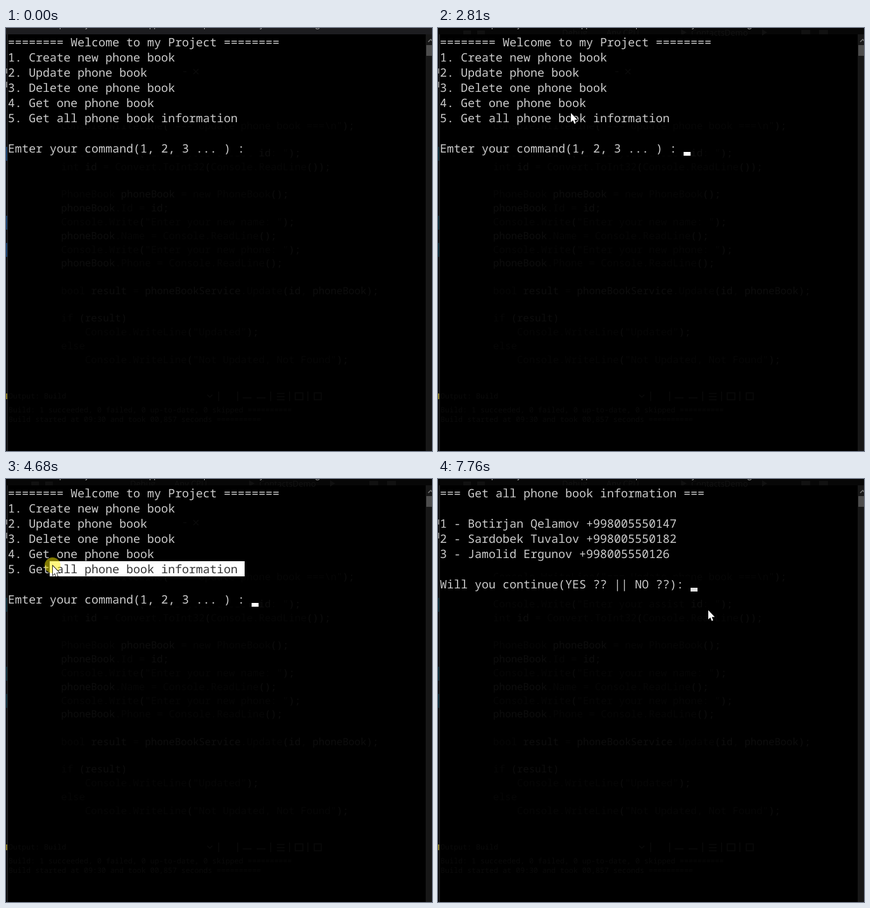
Recreate the animation shown at these times as an HTML page. Size 673 by 669 pixels, loop 8 s.

```html
<!DOCTYPE html>
<html lang="en">
<head>
<meta charset="utf-8">
<title>Phone book console</title>
<style>
  html, body { margin: 0; width: 100%; height: 100%; overflow: hidden; background: #000; }
  svg { display: block; width: 100vw; height: 100vh; }
  text { white-space: pre; font-family: "Noto Sans Mono", monospace; text-rendering: geometricPrecision; }
  .term { font-size: 18.333px; fill: #ccc; }
  .code { font-size: 15.77px; fill: #060606; }
  .code .hi { fill: #0d0d0d; }
  .log { font-size: 11.67px; fill: #0a0a0a; }
  .bar { font: 13px "Open Sans", sans-serif; fill: #131313; }
  .title { font: 12px "Open Sans", sans-serif; fill: #bbb; }
  #sel { mix-blend-mode: difference; }
</style>
</head>
<body>
<svg viewBox="0 0 673 669" preserveAspectRatio="none">
  <rect width="673" height="669"/>
  <g id="code"></g>
  <g id="log">
    <text class="log" x="4" y="586">Output: Build</text>
    <text class="log" x="4" y="608">Build: 1 succeeded, 0 failed, 0 up-to-date, 0 skipped ==========</text>
    <text class="log" x="4" y="623">Build started at 09:30 and took 00,857 seconds ==========</text>
    <path d="M318 580l4 4 4-4M336 575v15M366 575v15M374 585h14M396 585h14M418 575v15M428 578h12M428 583h12M428 588h12M448 575v15M457 577h12v11h-12zM477 575v15M487 577h11v11h-11z"
      fill="none" stroke="#0a0a0a" stroke-width="1.5"/>
    <path d="M280 69h5M296 65l8 8M304 65l-8 8" stroke="#0a0a0a" stroke-width="1.5"/>
  </g>
  <rect id="strip" width="673" height="10"/>
  <g id="tools">
    <text class="bar" x="196" y="12">Debug</text>
    <text class="bar" x="266" y="12">Any CPU</text>
    <text class="bar" x="400" y="12">ContactsDemo</text>
    <path d="M384 2l9 5-9 5zM40 4h12v6H40zM62 4h12v6H62zM512 2l8 5-8 5zM574 3h14v7h-14zM602 3h14v7h-14z" fill="#111"/>
  </g>
  <text class="title" x="84" y="-1">p</text>
  <text class="title" x="126" y="-1">j</text>
  <text class="title" x="226" y="-1">pp</text>
  <text class="title" x="312" y="-1">p</text>
  <text class="title" x="401" y="-1">y</text>
  <text class="title" x="489" y="-1">g</text>
  <rect y="10" width="2" height="659" fill="#0c0c0e"/>
  <rect x="2" y="10" width="1" height="659" fill="#2a2a2c"/>
  <g id="marks">
    <rect y="188" width="2" height="22"/>
    <rect y="297" width="2" height="22"/>
    <rect y="340" width="2" height="22"/>
  </g>
  <rect y="578" width="2" height="9" fill="#8a7a20"/>
  <rect y="64" width="2" height="8" fill="#777"/>
  <rect y="85" width="2" height="9" fill="#777"/>
  <g id="menu"></g>
  <g id="head"></g>
  <g id="list"></g>
  <text id="typed" class="term" x="388" y="197">5</text>
  <rect id="sel" y="130" height="24" fill="#fff"/>
  <rect id="caret" width="11" height="6"/>
  <rect x="663" y="10" width="10" height="659" fill="#171717"/>
  <rect x="664" y="27" width="9" height="17" fill="#4d4d4d"/>
  <path d="M667 22l4-4 4 4" fill="none" stroke="#777" stroke-width="1.5"/>
  <g id="mouse">
    <circle id="press" cx=".5" cy=".5" r="12.5" fill="#fff000" fill-opacity=".5"/>
    <path d="M1 1.5V16L4.2 13 6.5 18.5 8.7 17.6 6.6 12.2H11.2Z" fill="#fff" stroke="#000" stroke-width="1.6" paint-order="stroke"/>
  </g>
</svg>
<script>
const LOOP = 8000, LEFT = 3, TOP = 10, CELL = 11, ROW = 24, BASE = 19;
const $ = id => document.getElementById(id);

function add(parent, tag, attrs, content = '') {
  const el = document.createElementNS('http://www.w3.org/2000/svg', tag);
  for (const k in attrs) el.setAttribute(k, attrs[k]);
  el.textContent = content;
  return parent.appendChild(el);
}

// Console cells that hold text are opaque.
function print(group, lines, first = 0) {
  lines.forEach((line, i) => {
    const y = TOP + ROW * (first + i);
    add(group, 'rect', { x: LEFT, y, width: line.length * CELL, height: ROW });
    add(group, 'text', { class: 'term', x: LEFT, y: y + BASE }, line);
  });
}

print($('menu'), [
  '======== Welcome to my Project ========',
  '1. Create new phone book',
  '2. Update phone book',
  '3. Delete one phone book',
  '4. Get one phone book',
  '5. Get all phone book information',
  '',
  'Emter your command(1, 2, 3 ... ) : '
]);
print($('head'), ['=== Get all phone book information ===']);
print($('list'), [
  '1 - Botirjan Qelamov +998005550147',
  '2 - Sardobek Tuvalov +998005550182',
  '3 - Jamolid Ergunov +998005550126',
  '',
  'Will you continue(YES ?? || NO ??): '
], 2);

[
  'Console.WriteLine("=== Update phone book ===\\n");',
  '',
  'Console.Write("Enter your assist id: ");',
  'int id = Convert.ToInt32(Console.ReadLine());',
  '',
  'PhoneBook phoneBook = new PhoneBook();',
  'phoneBook.Id = id;',
  'Console.Write("Enter your new name: ");',
  'phoneBook.Name = Console.ReadLine();',
  'Console.Write("Enter your new phone: ");',
  'phoneBook.Phone = Console.ReadLine();',
  '',
  'bool result = phoneBookService.Update(id, phoneBook);',
  '',
  'if (result)',
  '    Console.WriteLine("Updated");',
  'else',
  '    Console.WriteLine("Not Updated, Not Found");'
].forEach((line, i) => {
  const text = add($('code'), 'text', { class: 'code', x: 87, y: 159.5 + 21.78 * i });
  line.split(/(\bphoneBook\w*|\bresult\b|\bid\b|[();]+)/).forEach((part, k) =>
    add(text, 'tspan', k % 2 ? { class: 'hi' } : {}, part));
});

// Pointer path: time, x, y
const path = [
  [250, 540, 522], [670, 414, 222], [1600, 414, 222], [2010, 407, 205],
  [2470, 407, 205], [2830, 207, 132], [3310, 363, 146], [3510, 363, 146],
  [3780, 367, 140], [4060, 367, 140], [4680, 73, 136], [4820, 48, 138],
  [4960, 33, 141], [5100, 33, 141], [5910, 426, 206], [LOOP, 426, 206]
];

function pointer(t) {
  const i = Math.max(1, path.findIndex(p => p[0] > t));
  const [t0, x0, y0] = path[i - 1], [t1, x1, y1] = path[i];
  const u = Math.min(1, Math.max(0, (t - t0) / (t1 - t0)));
  const e = u * u * (3 - 2 * u);
  return [x0 + (x1 - x0) * e, y0 + (y1 - y0) * e].map(Math.round);
}

const within = (t, ...spans) => spans.some(([a, b]) => t >= a && t < b);
const show = (id, on) => $(id).setAttribute('visibility', on ? 'visible' : 'hidden');
const set = (id, attrs) => { for (const k in attrs) $(id).setAttribute(k, attrs[k]); };

function draw(t) {
  const [x, y] = pointer(t);
  const focused = t >= 1070, done = t >= 7760;

  set('strip', { fill: focused ? '#070707' : '#1d1d20' });
  set('marks', { fill: focused ? '#0c2c38' : '#183e6c' });
  show('tools', focused);

  show('menu', t < 7700);
  show('head', t >= 7700);
  show('list', done);
  show('typed', within(t, [7300, 7700]));

  show('mouse', t >= 250);
  set('mouse', { transform: `translate(${x} ${y})` });
  $('press').style.display =
    within(t, [1070, 1200], [4060, 5160], [6180, 6440]) ? '' : 'none';

  // The selection follows the pointer until the button is released.
  const col = t < 4960 ? Math.floor((x - LEFT) / CELL) : 2;
  const from = LEFT + CELL * Math.max(2, Math.min(33, col));
  show('sel', within(t, [4060, 6180]));
  set('sel', { x: from, width: 377 - from });

  show('caret', within(t, [1600, 2150], [2680, 3210], [3740, 6440], [6970, 7510], [7760, LOOP]));
  set('caret', {
    x: t < 7300 ? 388 : 399,
    y: done ? 172 : 196,
    fill: done ? '#e0e0e0' : '#fff'
  });
}

function tick() {
  draw(performance.now() % LOOP);
  requestAnimationFrame(tick);
}
tick();
</script>
</body>
</html>
```
